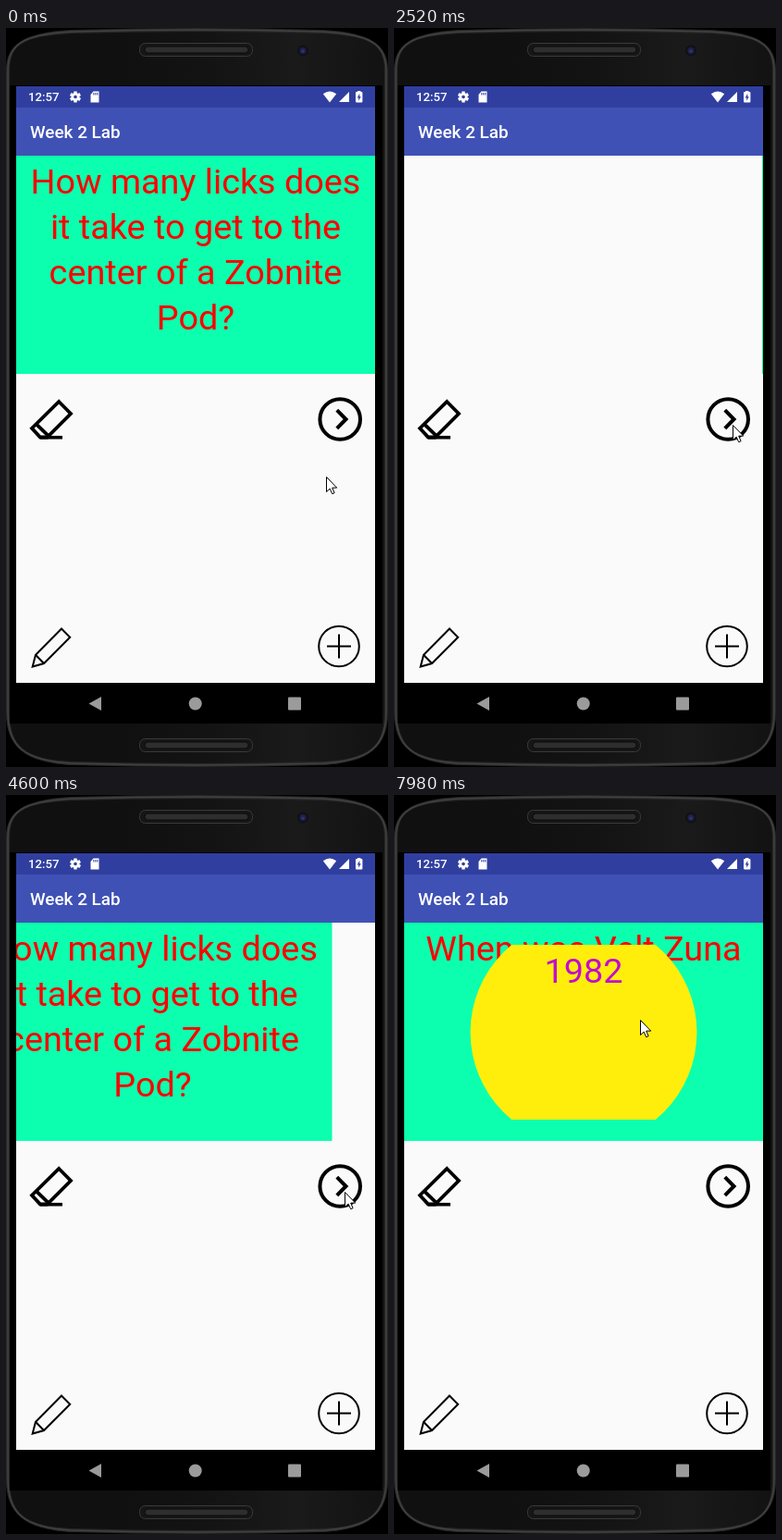
An HTML page with a canvas for the animation above (8 s loop, 413x799 px).

```html
<!DOCTYPE html>
<html lang="en">
<head>
<meta charset="utf-8">
<title>Flashcards</title>
<style>
  html, body { margin: 0; width: 100%; height: 100%; overflow: hidden; background: #000; }
  canvas { display: block; width: 413px; height: 799px; }
</style>
</head>
<body>
<canvas id="stage" width="413" height="799"></canvas>
<script>
const canvas = document.getElementById('stage');
const ctx = canvas.getContext('2d');
const LOOP = 8000;
const SCREEN = { x: 11, w: 388, mid: 205 };
const WHITE = '#fafafa';

const LICKS = ['How many licks does', 'it take to get to the', 'center of a Zobnite', 'Pod?'];
const DRINK = ['When was Velt Zuna', 'invented?'];
const CODE = ['What was the first', 'product to have a', 'barcode?'];

// show: first visible movement; start: where the easing begins; dur: each half; gap: empty pause
const slides = [
  { show: 1110, start: 1048, dur: 261, gap: 40, from: LICKS, to: DRINK },
  { show: 2240, start: 2178, dur: 293, gap: 40, from: DRINK, to: CODE },
  { show: 3450, start: 3388, dur: 293, gap: 40, from: CODE, to: LICKS },
  { show: 4600, start: 4533.5, dur: 300, gap: 56, from: LICKS, to: DRINK }
];

// time, x, y of the pointer
const pointer = [
  [20, 346, 485], [540, 366, 429],
  [5200, 366, 429], [5380, 313, 312],
  [5410, 313, 312], [5530, 266, 243]
];

const clamp = v => Math.max(0, Math.min(1, v));
const ease = v => (1 - Math.cos(Math.PI * clamp(v))) / 2;

function rect(x, y, w, h, color) {
  ctx.fillStyle = color;
  ctx.fillRect(x, y, w, h);
}

function trace(points, closed) {
  ctx.beginPath();
  points.forEach(([x, y], i) => i ? ctx.lineTo(x, y) : ctx.moveTo(x, y));
  if (closed) ctx.closePath();
}

function line(points, width, color = '#000', closed = false) {
  trace(points, closed);
  ctx.lineWidth = width;
  ctx.strokeStyle = color;
  ctx.stroke();
}

function shape(points, color) {
  trace(points, true);
  ctx.fillStyle = color;
  ctx.fill();
}

function disc(x, y, r, color) {
  ctx.beginPath();
  ctx.arc(x, y, r, 0, 7);
  ctx.fillStyle = color;
  ctx.fill();
}

function ring(x, y, r, width, color = '#000') {
  ctx.beginPath();
  ctx.arc(x, y, r, 0, 7);
  ctx.lineWidth = width;
  ctx.strokeStyle = color;
  ctx.stroke();
}

function pill(x, y, w, h, r, fill, stroke) {
  ctx.beginPath();
  ctx.roundRect(x, y, w, h, r);
  ctx.fillStyle = fill;
  ctx.fill();
  if (stroke) {
    ctx.lineWidth = 1;
    ctx.strokeStyle = stroke;
    ctx.stroke();
  }
}

function text(str, x, y, size, color, weight = 400, align = 'left') {
  ctx.font = `${weight} ${size}px Roboto, sans-serif`;
  ctx.textAlign = align;
  ctx.fillStyle = color;
  ctx.fillText(str, x, y);
}

function gradient(x0, y0, x1, y1, colors) {
  const g = ctx.createLinearGradient(x0, y0, x1, y1);
  colors.forEach((c, i) => g.addColorStop(i / (colors.length - 1), c));
  return g;
}

function bodyPath(inset) {
  const l = inset, r = 413 - inset, t = inset, b = 799 - inset;
  ctx.beginPath();
  ctx.moveTo(l, 46);
  ctx.bezierCurveTo(l, 18, 18, t + 5, 70, t + 2);
  ctx.quadraticCurveTo(206, t - 2, 343, t + 2);
  ctx.bezierCurveTo(395, t + 5, r, 18, r, 46);
  ctx.lineTo(r, 740);
  ctx.bezierCurveTo(r, 777, 393, b - 5, 343, b - 2);
  ctx.quadraticCurveTo(206, b + 2, 70, b - 2);
  ctx.bezierCurveTo(20, b - 5, l, 777, l, 740);
  ctx.closePath();
}

function speaker(y) {
  pill(144.5, y + .5, 122, 14, 6, '#161616', '#3a3a3a');
  pill(150, y + 4, 112, 7, 3.5, '#2e2e2e', '#0b0b0b');
}

function phone() {
  rect(0, 0, 413, 799, '#000');
  bodyPath(0);
  ctx.fillStyle = '#282828';
  ctx.fill();
  bodyPath(2);
  ctx.lineWidth = 1.5;
  ctx.strokeStyle = '#424242';
  ctx.stroke();
  bodyPath(4);
  ctx.fillStyle = gradient(120, 0, 413, 0, ['#101010', '#131313', '#1a1a1a', '#121212']);
  ctx.fill();
  rect(4, 62, 403, 690, '#000');
  speaker(16);
  speaker(768);
  disc(321, 24.5, 6, '#11111a');
  disc(321, 24.5, 3.5, '#20204a');
  disc(321, 25, 1.5, '#343478');
}

function navBar() {
  const gray = '#9b9b9b';
  shape([[89.5, 730.5], [103, 723], [103, 738]], gray);
  disc(204.7, 730.5, 7, gray);
  pill(305, 723.5, 14, 14, 1, gray);
}

function gear(x, y) {
  ctx.save();
  ctx.translate(x, y);
  ctx.fillStyle = '#fff';
  for (let i = 0; i < 6; i++) {
    ctx.fillRect(-1.7, -6, 3.4, 4);
    ctx.rotate(Math.PI / 3);
  }
  ctx.restore();
  ring(x, y, 3.2, 2.6, '#fff');
}

function statusBar(t) {
  const roaming = t >= 4850 && t < 6670;
  const weak = t >= 4850 && t < 6820;
  rect(11, 63, 388, 23, '#303f9f');
  text('12:57', 24, 79.3, 13.2, '#fff', 500);
  gear(75, 74.5);
  shape([[94.5, 68.5], [100.5, 68.5], [100.5, 80.5], [91.5, 80.5], [91.5, 72]], '#fff');
  for (let i = 0; i < 3; i++) rect(94.3 + i * 2, 70, 1, 2.5, '#303f9f');

  const wx = roaming ? 348 : 350;
  ctx.beginPath();
  ctx.moveTo(wx, 80.5);
  ctx.lineTo(wx - 7.2, 71.3);
  ctx.quadraticCurveTo(wx, 65.5, wx + 7.2, 71.3);
  ctx.closePath();
  ctx.fillStyle = '#fff';
  ctx.fill();

  if (weak) line([[370.5, 70.2], [370.5, 79.5], [361.2, 79.5]], 1, '#8f98cc', true);
  else shape([[371, 69], [371, 80], [360, 80]], '#fff');
  if (roaming) text('R', 358, 73.5, 6.5, '#d5d9ee', 500);

  rect(380, 68, 3.4, 2, '#fff');
  pill(378, 69, 7.4, 11.5, 1, '#fff');
  shape([[382.3, 70.8], [379.7, 75.5], [381.3, 75.5], [381.1, 78.8], [383.8, 74.2], [382.3, 74.2]], '#303f9f');
}

function appBar() {
  rect(11, 138, 388, 2, gradient(0, 138, 0, 140, ['rgba(0,0,0,.07)', 'rgba(0,0,0,0)']));
  rect(11, 86, 388, 52, '#3f51b5');
  text('Week 2 Lab', 26, 118.8, 18.9, '#fff', 500);
}

function icons() {
  ctx.lineJoin = 'miter';
  // eraser
  line([[57.2, 404], [70, 417], [44.5, 442.5], [37, 442.5], [28, 432.7]], 3.8, '#000', true);
  line([[32.5, 428.2], [46, 441.2]], 3.8);
  line([[37, 442.7], [61, 442.7]], 3.6);
  // next
  ring(361.2, 423, 21.8, 4);
  line([[357.8, 413.2], [367.5, 423], [357.8, 432.8]], 4);
  // pencil
  line([[60, 649.5], [69.2, 658.7], [41, 687], [28.7, 690.5], [32, 677.7]], 2, '#000', true);
  line([[32, 677.7], [41, 687]], 2);
  // add
  ring(360, 668.5, 21.8, 2);
  line([[347, 668.5], [373, 668.5]], 2);
  line([[360, 655.5], [360, 681.5]], 2);
}

function question(lines, dx) {
  rect(SCREEN.x + dx, 138, SCREEN.w, 236, '#0cffae');
  lines.forEach((s, i) => text(s, SCREEN.mid + dx, 179 + i * 49, 37.8, '#f00', 400, 'center'));
}

function answer(radius) {
  ctx.save();
  ctx.beginPath();
  ctx.arc(SCREEN.mid, 256.5, radius, 0, 7);
  ctx.clip();
  rect(11, 162, 388, 189, '#ffee0c');
  text('1982', SCREEN.mid, 202.7, 37.8, '#c20cd0', 400, 'center');
  ctx.restore();
}

function cards(t) {
  const full = Math.hypot(194, 94.5);
  if (t >= 7570) {
    question(DRINK, 0);
    return answer(full * (1 - ease((t - 7524) / 1000)));
  }
  if (t >= 6020) return answer(t >= 6500 ? 400 : full * ease((t - 6000) / 500));

  const s = slides.filter(v => t >= v.show).pop();
  if (!s) return question(LICKS, 0);
  const age = t - s.start;
  const entry = age - s.dur - s.gap;
  if (age < s.dur) question(s.from, -SCREEN.w * ease(age / s.dur));
  else if (entry >= 0) question(s.to, SCREEN.w * (1 - ease(entry / s.dur)));
}

function cursor(t) {
  let [, x, y] = pointer[0];
  for (let i = 1; i < pointer.length; i++) {
    const [t0, x0, y0] = pointer[i - 1], [t1, x1, y1] = pointer[i];
    if (t < t0) break;
    const k = clamp((t - t0) / (t1 - t0));
    x = x0 + (x1 - x0) * k;
    y = y0 + (y1 - y0) * k;
  }
  ctx.save();
  ctx.translate(x + .5, y + .5);
  const arrow = [[0, 0], [0, 16], [3.7, 12.6], [6.2, 18.2], [8.6, 17.2], [6.2, 11.6], [11.2, 11.6]];
  shape(arrow, '#fff');
  ctx.lineJoin = 'round';
  line(arrow, 1, '#000', true);
  ctx.restore();
}

function draw(t) {
  phone();
  rect(11, 63, 388, 645, WHITE);
  ctx.save();
  ctx.beginPath();
  ctx.rect(11, 63, 388, 645);
  ctx.clip();
  cards(t);
  appBar();
  statusBar(t);
  icons();
  ctx.restore();
  navBar();
  cursor(t);
}

const begin = performance.now();
function tick() {
  draw((performance.now() - begin) % LOOP);
  requestAnimationFrame(tick);
}
tick();
</script>
</body>
</html>
```
